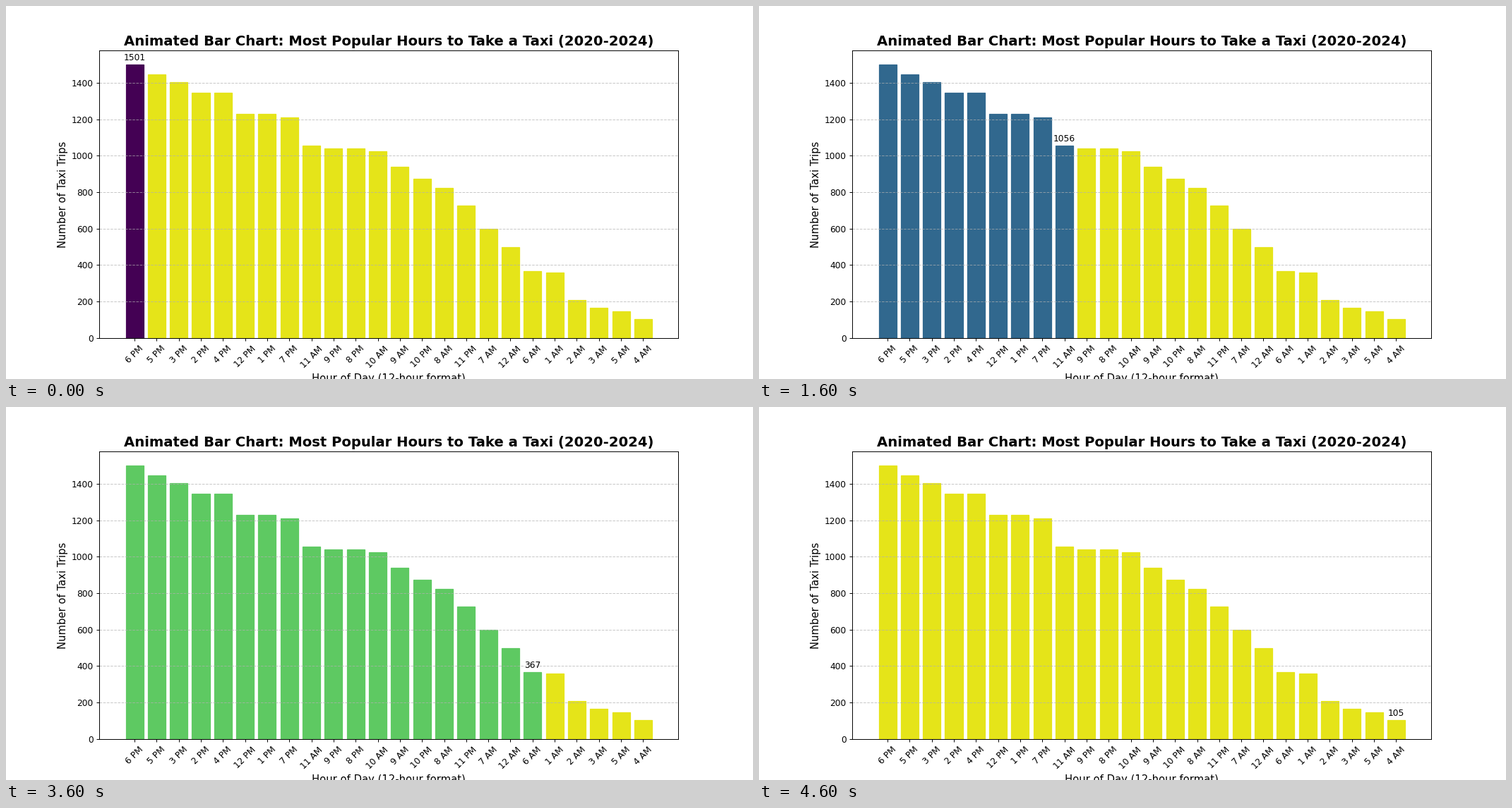
Write a matplotlib script that moves like this. It is 1058 px wide and 529 px high and loops after 4.8 s.

```python
import matplotlib.pyplot as plt
from matplotlib.animation import FuncAnimation

WIDTH, HEIGHT = 1058, 529
STEP_MS = 200

HOURS = ("6 PM,5 PM,3 PM,2 PM,4 PM,12 PM,1 PM,7 PM,11 AM,9 PM,8 PM,10 AM,"
         "9 AM,10 PM,8 AM,11 PM,7 AM,12 AM,6 AM,1 AM,2 AM,3 AM,5 AM,4 AM").split(",")
TRIPS = [1501, 1447, 1405, 1347, 1344, 1231, 1228, 1210, 1056, 1042, 1042, 1025,
         940, 875, 824, 726, 599, 500, 367, 358, 207, 164, 145, 105]
COUNT = len(TRIPS)

plt.rcParams["font.family"] = "DejaVu Sans"
cmap = plt.get_cmap("viridis")


def shade(i):
    return cmap(i / COUNT)


fig, ax = plt.subplots(figsize=(12, 6), dpi=WIDTH / 12)
bars = ax.bar(range(COUNT), TRIPS)
ax.set_title("Animated Bar Chart: Most Popular Hours to Take a Taxi (2020-2024)",
             fontsize=16, fontweight="bold")
ax.set_xlabel("Hour of Day (12-hour format)", fontsize=12)
ax.set_ylabel("Number of Taxi Trips", fontsize=12)
ax.set_xticks(range(COUNT), HOURS, rotation=45)
ax.grid(axis="y", linestyle="--", alpha=0.7)
label = ax.text(0, 0, "", ha="center", va="bottom", fontsize=10)


def update(i):
    """Recolour every bar reached so far and label the newest one."""
    for k, bar in enumerate(bars):
        bar.set_color(shade(i if k <= i else COUNT - 1))
    label.set_position((i, TRIPS[i] + 10))
    label.set_text(str(TRIPS[i]))
    return [*bars, label]


anim = FuncAnimation(fig, update, frames=COUNT, init_func=lambda: update(0),
                     interval=STEP_MS, repeat=True, repeat_delay=0, blit=False)

plt.show()
```
